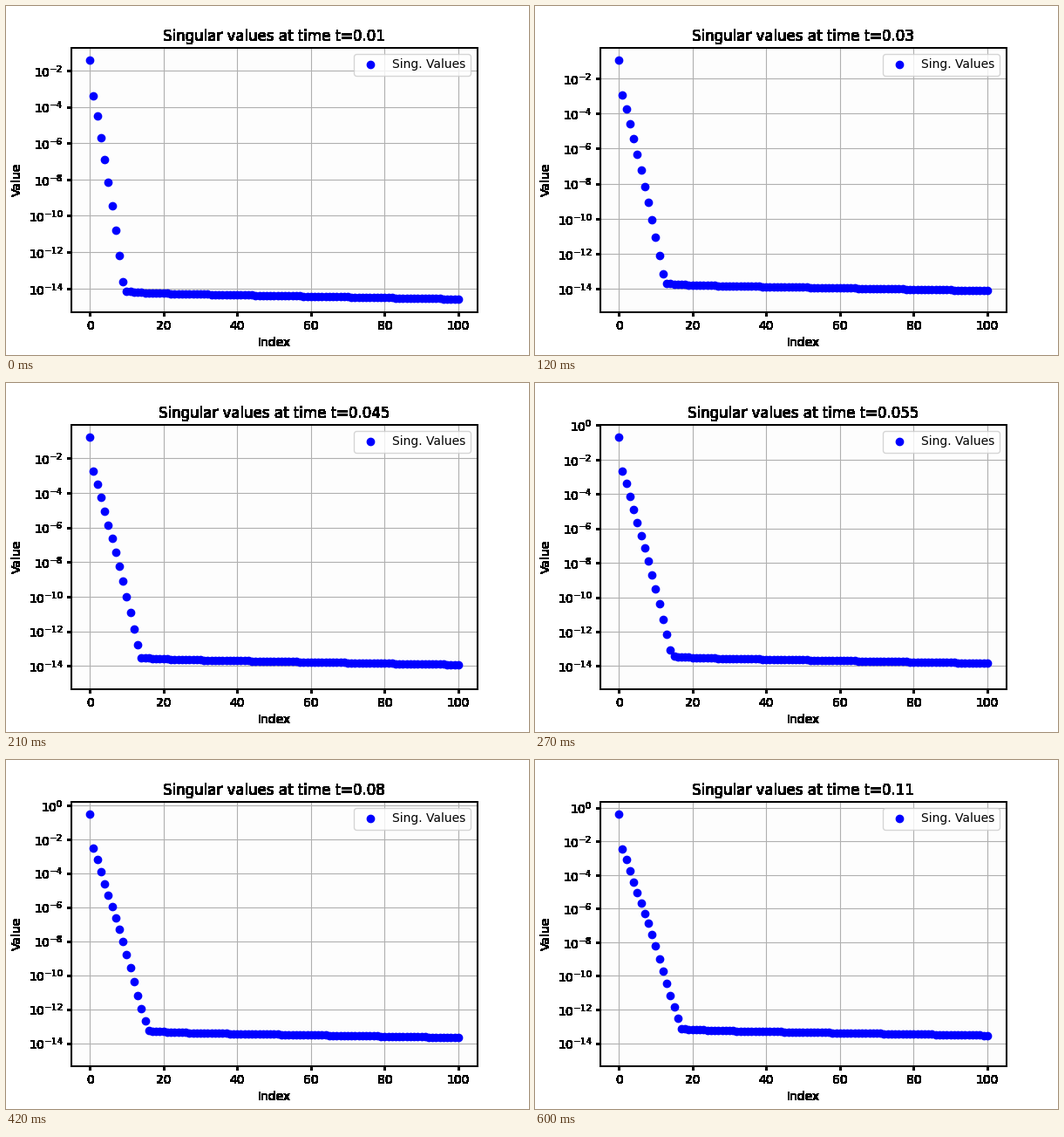
A matplotlib script that plays this animation: 600x400 px, repeating every 0.63 s.

```python
import numpy as np
import matplotlib.pyplot as plt
from matplotlib.animation import FuncAnimation
from matplotlib.ticker import FixedLocator

FRAMES = 21
STEP_MS = 30
START, STEP = 0.01, 0.005
LOWEST = -14.604        # smallest log10 value, reached at the start
index = np.arange(101)


def first_log(t):
    return np.log10(3.853 * t)


def steep_part(t):
    """Quadratic drop that flattens with time, with a slight growing wave."""
    growth = np.log10(t / START)
    speed = 1 / np.sqrt(t)
    n = index - 1
    head = -3.40 + 1.05 * growth - 0.2 * growth ** 2
    drop = (0.38 + 0.0718 * speed) * n + (0.0026 * speed - 0.003) * n ** 2
    return head - drop + 0.8 * t * np.cos(np.pi * n / 4)


def log_values(t):
    steep = steep_part(t)
    steep[0] = first_log(t)
    floor = -14.584 + 1.01 * np.log10(t / START) + 0.0038 * (100 - index)
    bend = np.count_nonzero(steep > floor)
    floor += 0.08 * np.exp(-np.maximum(index - bend, 0) / 5)
    return np.maximum(steep, floor)


def harden(img, dpi):
    """Make every touched pixel opaque, so edges outside the plot are hard."""
    img[..., 3] = img[..., 3] > 0
    return np.round(img * 255).astype(np.uint8), 0, 0


fig, ax = plt.subplots(figsize=(6, 4), dpi=100, facecolor="white")
fig.subplots_adjust(left=0.125, right=0.9, bottom=0.125, top=0.88)
ax.set_facecolor("#fdfdfd")
ax.set_agg_filter(harden)
ax.set_yscale("log")
ax.yaxis.set_major_locator(FixedLocator(10.0 ** np.arange(-14, 1, 2)))
ax.minorticks_off()
ax.set_xlim(-5, 105)
ax.set_xlabel("Index")
ax.set_ylabel("Value")
ax.grid(True)
dots, = ax.plot(index, 10 ** log_values(START), "bo", label="Sing. Values")
ax.legend(loc="upper right")


def update(k):
    t = START + STEP * k
    dots.set_ydata(10 ** log_values(t))
    top = first_log(t)
    margin = 0.05 * (top - LOWEST)
    ax.set_ylim(10 ** (LOWEST - margin), 10 ** (top + margin))
    # just left of the middle, so the text rounds to the left pixel
    ax.set_title(f"Singular values at time t={t:g}", x=0.4999)
    return [dots]


anim = FuncAnimation(fig, update, frames=FRAMES, interval=STEP_MS,
                     init_func=lambda: update(0), repeat=True, repeat_delay=0)
plt.show()
```
